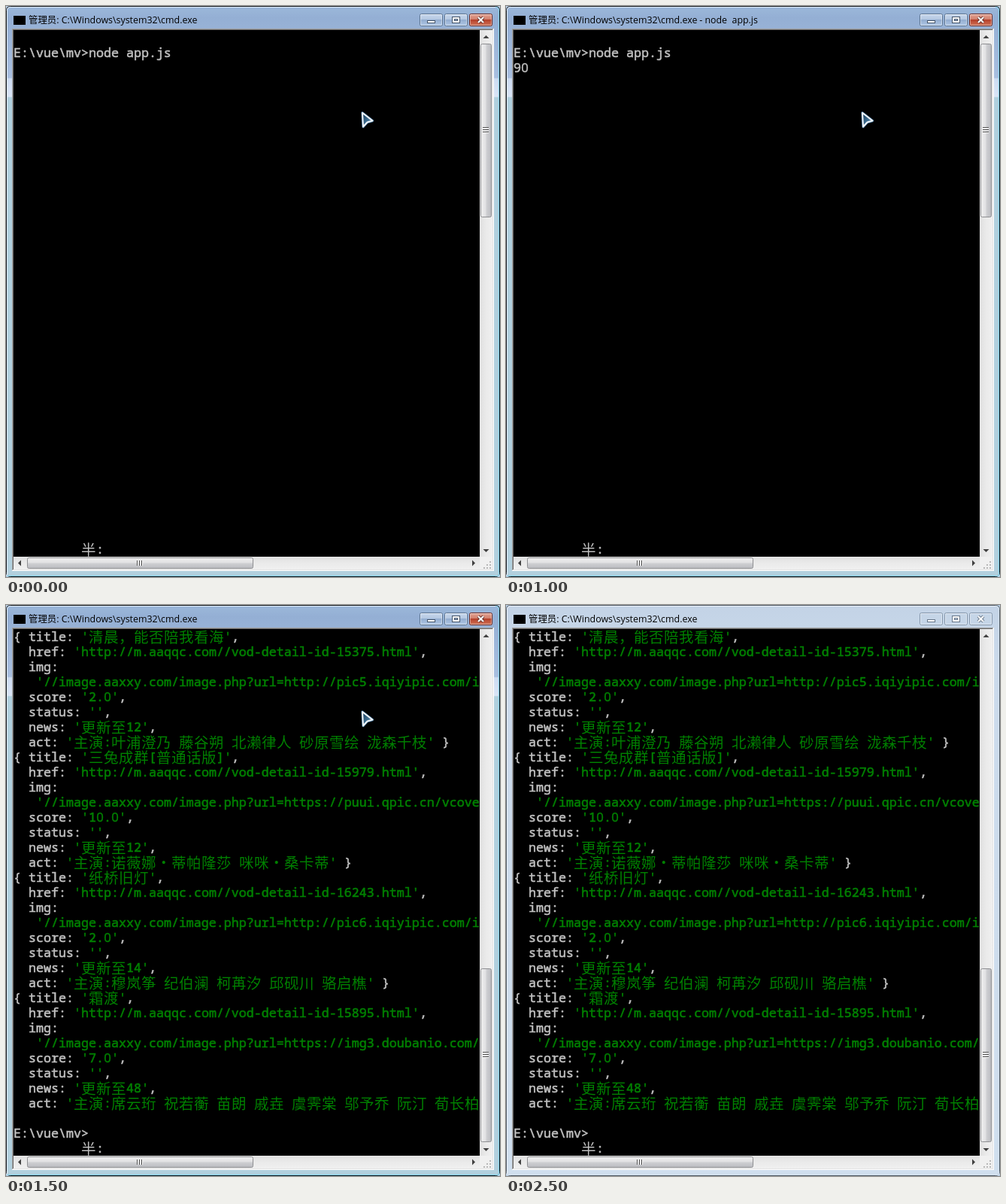
Recreate the animation shown at these times as an HTML page. Size 657 by 759 pixels, loop 3000 ms.

```html
<!DOCTYPE html>
<html lang="zh-CN">
<head>
<meta charset="utf-8">
<title>cmd.exe</title>
<style>
  html, body { margin: 0; width: 100%; height: 100%; overflow: hidden; background: #b4c8dc; }
  svg { display: block; }
  text { white-space: pre; }
  .latin { font: 500 16.667px "Noto Sans Mono", monospace; stroke-width: .6px; }
  .zero { font: 500 16.667px "Open Sans", sans-serif; stroke-width: .5px; }
  .plain { fill: #c0c0c0; stroke: #c0c0c0; }
  .str { fill: #008000; stroke: #008000; }
  .wide { font: 300 19.5px "Noto Sans CJK SC", "Noto Sans CJK", "Noto Sans CJK JP", sans-serif; letter-spacing: .5px; stroke: none; }
  .caption { font: 12.4px "Open Sans", "Noto Sans CJK SC", "Noto Sans CJK", sans-serif; fill: #000; }
</style>
</head>
<body>
<svg id="stage" width="657" height="759" viewBox="0 0 657 759">
  <defs>
    <linearGradient id="glass" x2="0" y2="1">
      <stop offset="0" stop-color="#9bb8da"/>
      <stop offset=".02" stop-color="#94afd4"/>
      <stop offset=".125" stop-color="#a9bfe0"/>
      <stop offset=".127" stop-color="#cddcf2"/>
      <stop offset=".158" stop-color="#dae5f6"/>
      <stop offset=".16" stop-color="#b0d0de"/>
      <stop offset="1" stop-color="#b2d0de"/>
    </linearGradient>
    <linearGradient id="pale" x2="0" y2="1">
      <stop offset="0" stop-color="#c3d3e6"/>
      <stop offset=".1" stop-color="#cbdaeb"/>
      <stop offset="1" stop-color="#d0dfee"/>
    </linearGradient>
    <linearGradient id="button" x2="0" y2="1">
      <stop offset="0" stop-color="#c9d8ec"/>
      <stop offset=".48" stop-color="#b3c7e1"/>
      <stop offset=".5" stop-color="#93add0"/>
      <stop offset="1" stop-color="#b2c9e6"/>
    </linearGradient>
    <linearGradient id="close" x2="0" y2="1">
      <stop offset="0" stop-color="#e4a797"/>
      <stop offset=".48" stop-color="#d07c69"/>
      <stop offset=".5" stop-color="#b5402a"/>
      <stop offset="1" stop-color="#d2765a"/>
    </linearGradient>
    <linearGradient id="thumbV">
      <stop offset="0" stop-color="#f0f0f0"/>
      <stop offset=".48" stop-color="#e0e0e2"/>
      <stop offset=".52" stop-color="#cfd0d3"/>
      <stop offset="1" stop-color="#babbc0"/>
    </linearGradient>
    <linearGradient id="thumbH" href="#thumbV" x2="0" y2="1"/>
    <linearGradient id="trackV">
      <stop offset="0" stop-color="#e0e0e0"/>
      <stop offset=".5" stop-color="#eaeaea"/>
      <stop offset="1" stop-color="#f0f0f0"/>
    </linearGradient>
    <linearGradient id="trackH" href="#trackV" x2="0" y2="1"/>
    <linearGradient id="arrow" x2="1" y2="1">
      <stop offset="0" stop-color="#123a5e"/>
      <stop offset="1" stop-color="#6b9fbe"/>
    </linearGradient>
    <clipPath id="client"><rect x="10" y="32" width="620" height="700"/></clipPath>
  </defs>
</svg>
<script>
const STEP = 500;
const stage = document.getElementById('stage');
const parts = [];

const add = (parent, tag, attrs, content) => {
  const el = document.createElementNS('http://www.w3.org/2000/svg', tag);
  for (const key in attrs) el.setAttribute(key, attrs[key]);
  if (content) el.textContent = content;
  return parent.appendChild(el);
};
const rect = (parent, x, y, width, height, fill, more) =>
  add(parent, 'rect', { x, y, width, height, fill, ...more });
const path = (parent, d, fill, more) => add(parent, 'path', { d, fill, ...more });

// A group shown in the half-second steps marked 1.
const part = (steps, attrs) => {
  const el = add(stage, 'g', attrs);
  parts.push({ el, steps });
  return el;
};

function drawFrame(steps, active) {
  const g = part(steps);
  const edge = active ? '#10161d' : '#4c5864';
  rect(g, .5, .5, 656, 758, `url(#${active ? 'glass' : 'pale'})`, { rx: 5, stroke: edge });
  path(g, 'M1.5 757V6q0-4.500 4.500-4.500H651', 'none', { stroke: active ? '#e4f0fa' : '#edf3fa' });
  path(g, 'M651 1.500q4.500 0 4.500 4.500V757.500H1.500', 'none', { stroke: active ? '#8adcf2' : '#dbe8f4' });

  const line = active ? '#5d7592' : '#8496ab';
  [550, 583, 616].forEach((x, i) => {
    const fill = active ? `url(#${i == 2 ? 'close' : 'button'})` : '#c5d5e7';
    rect(g, x + .5, 10.5, 30, 16, fill, { rx: 2, stroke: active && i == 2 ? '#6a2b27' : line });
    rect(g, x + 1.5, 11.5, 28, 14, 'none', { rx: 1, stroke: '#fff', 'stroke-opacity': .45 });
  });
  const ink = { stroke: active ? '#46566b' : '#69788b' };
  rect(g, 560.5, 19.5, 10, 3, '#fff', ink);
  rect(g, 593.5, 14.5, 10, 8, '#fff', ink);
  rect(g, 596.5, 17.5, 4, 2, active ? '#a5bbd8' : '#c5d5e7', ink);
  const cross = 'M628 15l7 7m0-7l-7 7';
  path(g, cross, 'none', { stroke: active ? '#64352f' : '#69788b', 'stroke-width': 4 });
  path(g, cross, 'none', { stroke: '#fff', 'stroke-width': 2.2 });
}

// Sunken edge: grey on the top and left, light on the bottom and right.
function drawClientEdge() {
  rect(stage, 8, 30, 641, 721, '#fff');
  rect(stage, 8, 30, 640, 720, '#a0a0a0');
  rect(stage, 9, 31, 639, 719, '#e3e3e3');
  rect(stage, 9, 31, 638, 718, '#696969');
}

function drawBars() {
  rect(stage, 10, 32, 620, 700, '#000');
  rect(stage, 630, 32, 17, 700, 'url(#trackV)');
  rect(stage, 10, 732, 620, 17, 'url(#trackH)');
  rect(stage, 630, 732, 17, 17, '#f0f0f0');
  const ink = '#404040';
  path(stage, 'M634.5 43l4-4 4 4z', ink);
  path(stage, 'M634.5 722l4 4 4-4z', ink);
  path(stage, 'M20 736.5l-4 4 4 4z', ink);
  path(stage, 'M620 736.5l4 4-4 4z', ink);
  for (let i = 0; i < 3; i++)
    for (let j = 0; j <= i; j++) rect(stage, 643 - 4 * j, 738 + 4 * i, 2, 2, '#b8b8b8');

  rect(stage, 28.5, 733.5, 300, 14, 'url(#thumbH)', { rx: 2, stroke: '#8e8f92' });
  for (let x = 174; x < 182; x += 3) {
    rect(stage, x, 737, 1, 7, '#505050');
    rect(stage, x + 1, 737, 1, 7, '#fff');
  }
}

function drawThumb(steps, y) {
  const g = part(steps);
  rect(g, 631.5, y + .5, 14, 230, 'url(#thumbV)', { rx: 2, stroke: '#8e8f92' });
  for (let i = 0; i < 3; i++) {
    rect(g, 634, y + 111 + 3 * i, 8, 1, '#505050');
    rect(g, 634, y + 112 + 3 * i, 8, 1, '#fff');
  }
}

function drawPointer(steps) {
  const g = part(steps, { 'stroke-linejoin': 'round' });
  const shape = 'M474 142L487.500 152.500L480.500 154.500L475 160.500Z';
  path(g, shape, 'none', { stroke: '#3f6f96', 'stroke-width': 3.4 });
  path(g, shape, 'url(#arrow)', { stroke: '#f2f6fa', 'stroke-width': 2 });
}

// Latin cells are 10px wide, CJK cells 20px; quoted strings are green.
function print(parent, row, line, col = 0) {
  let x = 10 + col * 10;
  for (const piece of line.split(/('[^']*'?)/)) {
    const tone = piece[0] == "'" ? 'str' : 'plain';
    for (const run of piece.match(/0+|[\u3000-\uffef]+|[^0\u3000-\uffef]+/g) || []) {
      const wide = run > '\u2fff', zero = run[0] == '0';
      const kind = wide ? 'wide' : zero ? 'zero' : 'latin';
      const y = 32 + row * 20 + (wide ? 17.5 : 16);
      if (zero)
        [...run].forEach((c, i) => add(parent, 'text', { x: x + .25 + i * 10, y, class: `${kind} ${tone}` }, c));
      else add(parent, 'text', { x, y, class: `${kind} ${tone}` }, run);
      x += run.length * (wide ? 20 : 10);
    }
  }
}

const films = [
  ['清晨，能否陪我看海', 15375, 'http://pic5.iqiyipic.com/i', '2.0', 12,
    "叶浦澄乃 藤谷朔 北濑律人 砂原雪绘 泷森千枝' }"],
  ['三兔成群[普通话版]', 15979, 'https://puui.qpic.cn/vcove', '10.0', 12,
    "诺薇娜・蒂帕隆莎 咪咪・桑卡蒂' }"],
  ['纸桥旧灯', 16243, 'http://pic6.iqiyipic.com/i', '2.0', 14,
    "穆岚筝 纪伯澜 柯苒汐 邱砚川 骆启樵' }"],
  ['霜渡', 15895, 'https://img3.doubanio.com/', '7.0', 48,
    '席云珩 祝若蘅 苗朗 戚垚 虞霁棠 邬予乔 阮汀 荀长柏']
];

const record = ([title, id, img, score, news, act]) => [
  `{ title: '${title}',`,
  `  href: 'http://m.aaqqc.com//vod-detail-id-${id}.html',`,
  '  img:',
  `   '//image.aaxxy.com/image.php?url=${img}`,
  `  score: '${score}',`,
  "  status: '',",
  `  news: '更新至${news}',`,
  `  act: '主演:${act}`
];

drawFrame('111110', true);
drawFrame('000001', false);
rect(stage, 10, 13, 16, 12, '#000');
add(stage, 'text', { x: 30, y: 23, class: 'caption' }, '管理员: C:\\Windows\\system32\\cmd.exe');
add(part('011000'), 'text', { x: 254, y: 23, class: 'caption' }, ' - node  app.js');
drawClientEdge();
drawBars();
drawThumb('111000', 50);
drawThumb('000111', 483);

const clip = { 'clip-path': 'url(#client)' };
print(part('111000', clip), 1, 'E:\\vue\\mv>node app.js');
print(part('001000', clip), 2, '90');
const listing = part('000111', clip);
films.flatMap(record).forEach((line, row) => print(listing, row, line));
print(listing, 33, 'E:\\vue\\mv>');
print(stage, 34, '半:', 9);

rect(part('010000'), 10, 72, 10, 20, '#c0c0c0');
rect(part('000010'), 110, 692, 10, 20, '#c0c0c0');
drawPointer('111100');

let shown = -1;
const start = performance.now();
function tick() {
  const step = Math.floor((performance.now() - start) / STEP) % 6;
  if (step != shown) {
    shown = step;
    for (const { el, steps } of parts) el.style.display = steps[step] == '1' ? '' : 'none';
  }
  requestAnimationFrame(tick);
}
tick();
</script>
</body>
</html>
```
